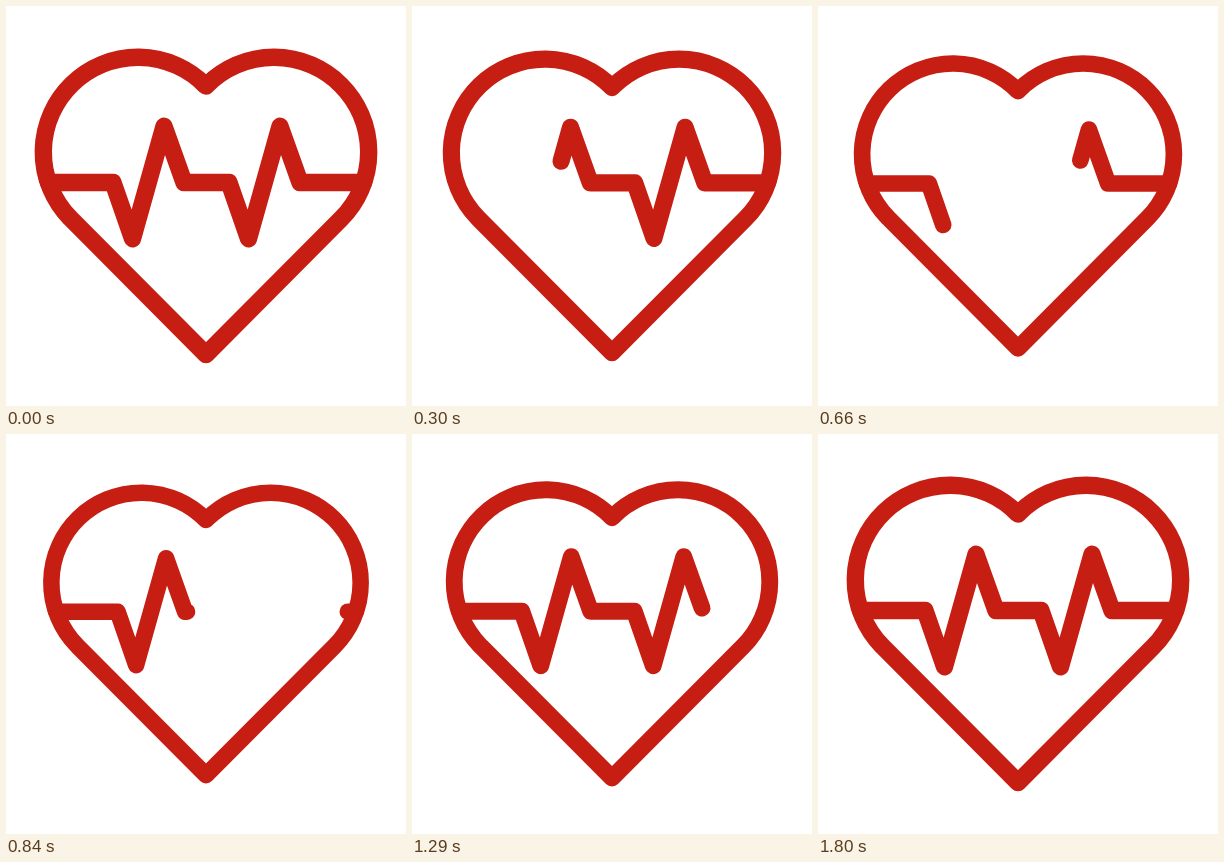
Recreate the animation shown at these times as an HTML page with a canvas. Size 400 px wide and 400 px high, loop 1830 ms.

```html
<!DOCTYPE html>
<html lang="en">
<head>
<meta charset="utf-8">
<title>Heartbeat</title>
<style>
  html, body { margin: 0; width: 100%; height: 100%; overflow: hidden; background: #fff; }
  canvas { display: block; width: 400px; height: 400px; }
</style>
</head>
<body>
<canvas id="stage" width="400" height="400"></canvas>
<script>
const ctx = document.getElementById('stage').getContext('2d');
const LOOP = 1830, STEP = 30, BEAT = 1800;
const ERASE_END = 850, DRAW_START = 470;
const RED = '#c71e14', WIDTH = 17.4;

// Heart: two lobes meeting at a notch, closed by straight sides.
const R = 94.7, LOBE = 68, LOBE_Y = 146, TIP_Y = 348.5;

// Pulse: a flat line with two equal zigzags.
const BASE = 176.5, SWING = 56.2, EDGE = 42.5, BEAT_X = 107, BEAT_GAP = 116;
const pulse = [[EDGE, BASE]];
for (const x of [BEAT_X, BEAT_X + BEAT_GAP]) {
  pulse.push([x, BASE], [x + 19.5, BASE + SWING], [x + 51, BASE - SWING], [x + 71, BASE]);
}
pulse.push([400 - EDGE, BASE]);

const length = pulse.slice(1).reduce(
  (sum, [x, y], i) => sum + Math.hypot(x - pulse[i][0], y - pulse[i][1]), 0);

const clamp = v => Math.min(1, Math.max(0, v));

// Cubic ease with handles (0.25, 0.1) and (0.25, 1), solved by bisection.
function ease(u) {
  const curve = (a, b, s) => 3 * a * s * (1 - s) ** 2 + 3 * b * s * s * (1 - s) + s ** 3;
  let lo = 0, hi = 1;
  for (let i = 0; i < 24; i++) {
    const mid = (lo + hi) / 2;
    if (curve(0.25, 0.25, mid) < u) lo = mid; else hi = mid;
  }
  return curve(0.1, 1, lo);
}

function drawHeart() {
  const notch = Math.acos(LOBE / R);
  ctx.beginPath();
  ctx.arc(200 - LOBE, LOBE_Y, R, -notch, Math.PI * 0.75, true);
  ctx.lineTo(200, TIP_Y);
  ctx.arc(200 + LOBE, LOBE_Y, R, Math.PI / 4, Math.PI + notch, true);
  ctx.closePath();
  ctx.setLineDash([]);
  ctx.stroke();
}

// Strokes the part of the pulse between two fractions of its length.
function drawPulse(from, to) {
  if (to <= from) return;
  ctx.beginPath();
  pulse.forEach(([x, y]) => ctx.lineTo(x, y));
  ctx.setLineDash([(to - from) * length, 2 * length]);
  ctx.lineDashOffset = -from * length;
  ctx.stroke();
}

function draw(t) {
  const scale = 0.975 + 0.025 * Math.cos(2 * Math.PI * t / BEAT);
  ctx.setTransform(1, 0, 0, 1, 0, 0);
  ctx.fillStyle = '#fff';
  ctx.fillRect(0, 0, 400, 400);
  ctx.translate(200, 200);
  ctx.scale(scale, scale);
  ctx.translate(-200, -200);
  ctx.strokeStyle = RED;
  ctx.lineWidth = WIDTH;
  ctx.lineCap = ctx.lineJoin = 'round';
  drawHeart();
  drawPulse(clamp(t / ERASE_END) ** 1.1, 1);
  drawPulse(0, ease(clamp((t - DRAW_START) / (BEAT - DRAW_START))));
}

const start = performance.now();
function tick() {
  const t = Math.max(0, performance.now() - start) % LOOP;
  draw(Math.floor(t / STEP) * STEP);
  requestAnimationFrame(tick);
}
tick();
</script>
</body>
</html>
```
